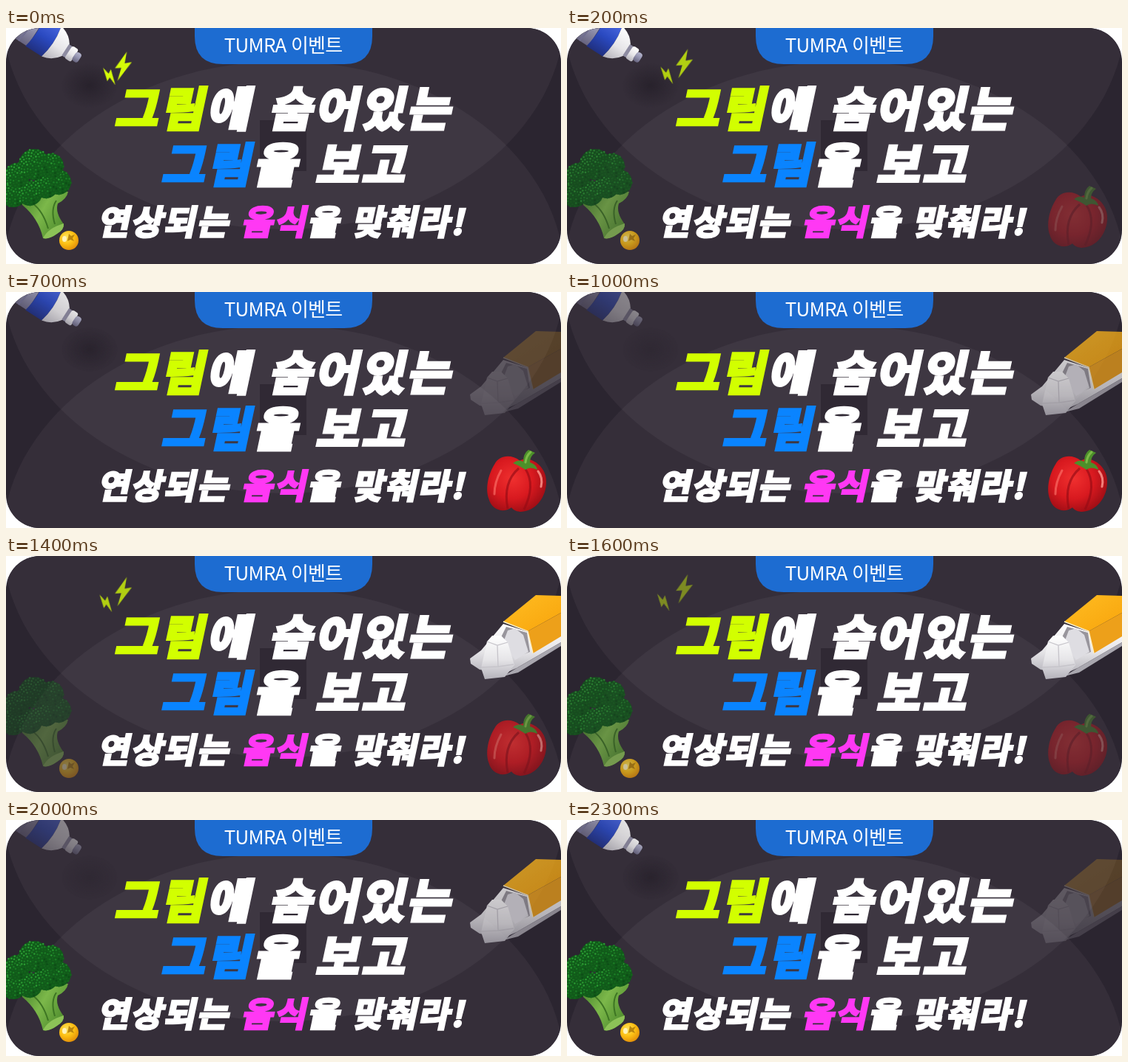
An HTML page for the animation above (2.4 s loop, 750 by 320 pixels).

```html
<!DOCTYPE html>
<html lang="ko">
<head>
<meta charset="utf-8">
<title>이벤트</title>
<style>
html, body { margin: 0; width: 100%; height: 100%; overflow: hidden; background: #fff; }
svg { display: block; width: 750px; height: 320px; }
text { font-family: "Noto Sans CJK KR", "Noto Sans CJK", "Noto Sans CJK JP", sans-serif; text-anchor: middle; }
.tab { font-size: 26px; letter-spacing: -.8px; fill: #fff; }
.title { font-weight: 900; fill: #fff; stroke: #fff; stroke-linejoin: miter; }
.big { font-size: 63px; letter-spacing: 4.2px; stroke-width: 4.4; }
.small { font-size: 46px; letter-spacing: 2.4px; stroke-width: 3; }
.lime { fill: #d2ff00; stroke: #d2ff00; }
.blue { fill: #0a84ff; stroke: #0a84ff; }
.pink { fill: #ff38f4; stroke: #ff38f4; }
.item { animation: swap 2400ms infinite; }
.pepper { animation-delay: -1200ms; }
.bottle { animation-delay: -1800ms; }
.carton { animation-delay: -600ms; }
.spark, .spark use { animation: 1200ms infinite; }
.spark { animation-name: spark; }
.spark .upper { animation-name: rise; }
.spark .lower { animation-name: drift; }

/* Each fade takes a quarter of the loop in six hard steps. */
@keyframes swap {
  0% { opacity: 1; animation-timing-function: steps(3); }
  12.5% { opacity: .62; animation-timing-function: steps(3); }
  25%, 50% { opacity: 0; animation-timing-function: steps(3); }
  62.5% { opacity: .62; animation-timing-function: steps(3); }
  75%, 100% { opacity: 1; }
}
@keyframes spark {
  0% { opacity: 1; animation-timing-function: steps(3); }
  25% { opacity: .68; animation-timing-function: steps(3); }
  50%, 100% { opacity: 0; }
}
@keyframes rise {
  0% { transform: translate(158px, 52px) rotate(3deg) scale(1.06); animation-timing-function: steps(6); }
  50%, 100% { transform: translate(158px, 41px) rotate(3deg) scale(1.06); }
}
@keyframes drift {
  0% { transform: translate(140px, 65px) rotate(-50deg) scale(.74); animation-timing-function: steps(6); }
  50%, 100% { transform: translate(126px, 61px) rotate(-50deg) scale(.74); }
}
</style>
</head>
<body>
<svg viewBox="0 0 750 320">
  <defs>
    <clipPath id="card"><rect width="750" height="320" rx="46"/></clipPath>
    <clipPath id="lens"><ellipse cx="375" cy="-20" rx="380" ry="293"/></clipPath>
    <path id="bolt" d="M4-19-10 3-2 2-6 19 11-6 2-4Z"/>
    <linearGradient id="plastic" x2="0" y2="1">
      <stop stop-color="#b4b4cc"/><stop offset=".45" stop-color="#9696b2"/><stop offset="1" stop-color="#67647f"/>
    </linearGradient>
    <linearGradient id="label" x2="0" y2="1">
      <stop stop-color="#4a68e0"/><stop offset=".5" stop-color="#2a49c0"/><stop offset="1" stop-color="#203080"/>
    </linearGradient>
    <linearGradient id="white" x2="0" y2="1">
      <stop stop-color="#fff"/><stop offset=".55" stop-color="#e6e5e8"/><stop offset="1" stop-color="#b4b2ba"/>
    </linearGradient>
    <linearGradient id="stem" x2="1" y2=".6">
      <stop stop-color="#44802a"/><stop offset=".5" stop-color="#7cb84a"/><stop offset="1" stop-color="#4f8c2e"/>
    </linearGradient>
    <radialGradient id="fruit" cx=".38" cy=".32" r=".75">
      <stop stop-color="#ffe35c"/><stop offset=".5" stop-color="#fcc014"/><stop offset="1" stop-color="#e08a08"/>
    </radialGradient>
    <radialGradient id="red" cx=".4" cy=".4" r=".72">
      <stop stop-color="#f0302f"/><stop offset=".5" stop-color="#d8191f"/><stop offset="1" stop-color="#8c0a12"/>
    </radialGradient>
    <radialGradient id="shade">
      <stop stop-color="#28222c"/><stop offset="1" stop-color="#28222c" stop-opacity="0"/>
    </radialGradient>
    <linearGradient id="sleeve" x2="1" y2="1">
      <stop stop-color="#ffbd22"/><stop offset="1" stop-color="#f8a40c"/>
    </linearGradient>
  </defs>

  <g clip-path="url(#card)">
    <rect width="750" height="320" fill="#2b2530"/>
    <ellipse cx="375" cy="-20" rx="380" ry="293" fill="#352e39"/>
    <ellipse cx="375" cy="338" rx="380" ry="293" fill="#352e39"/>
    <ellipse cx="375" cy="338" rx="380" ry="293" fill="#3e3742" clip-path="url(#lens)"/>
    <rect x="343" y="125" width="63" height="69" fill="#302934"/>

    <path d="M255 0H495V11Q495 49 457 49H293Q255 49 255 11Z" fill="#1d6cd1"/>
    <text class="tab" x="374.6" y="32.5">TUMRA 이벤트</text>

    <g class="item bottle">
      <ellipse cx="113" cy="78" rx="38" ry="30" fill="url(#shade)"/>
      <g transform="translate(50 10) rotate(33)">
        <path d="M-60-23H-10V24H-60Z" fill="url(#plastic)"/>
        <path d="M-38-23Q-33 0-38 24M-24-23Q-19 0-24 24" fill="none" stroke="#706e90" stroke-width="2"/>
        <path d="M-12-24H14Q20 0 14 25H-12Q-7 0-12-24Z" fill="url(#label)"/>
        <path d="M14-24Q29-21 37-9V9Q29 22 14 25Q20 0 14-24Z" fill="url(#white)"/>
        <path d="M36-9H42V9H36Z" fill="#8e8ca2"/>
        <rect x="41" y="-10" width="10" height="20" rx="3" fill="url(#white)"/>
        <rect x="50" y="-7" width="9" height="14" rx="4" fill="url(#plastic)"/>
      </g>
    </g>

    <g class="spark" fill="#d4fc08">
      <use class="upper" href="#bolt"/>
      <use class="lower" href="#bolt"/>
    </g>

    <g class="item broccoli">
      <path d="M22 230 50 222 84 222Q82 232 70 238 66 250 78 266 79 273 69 279 58 287 50 285 44 258 22 240Z" fill="url(#stem)"/>
      <path d="M50 285Q57 271 78 265 79 273 69 279 58 287 50 285Z" fill="#8cc257"/>
      <path d="M36 238Q50 248 57 272M68 234Q60 246 66 266" fill="none" stroke="#3d7523" stroke-width="2"/>
      <g id="crown"></g>
      <circle cx="85" cy="288" r="13" fill="url(#fruit)"/>
      <ellipse cx="79" cy="286" rx="3" ry="4" fill="#fff3b8"/>
      <path d="M85 279 88 282 93 280 90 285 92 289 87 287 83 289 84 284Z" fill="#b9850d"/>
    </g>

    <g class="item pepper">
      <path transform="translate(691 262) rotate(13) scale(1.04) translate(-694 -262)" d="M659 242C662 229 677 224 690 230C701 220 724 229 729 247C734 264 728 284 713 292C706 296 698 296 693 292C684 303 668 300 662 288C654 276 654 256 659 242Z" fill="url(#red)"/>
      <path d="M693 239Q671 258 678 294M702 240Q716 262 700 295" fill="none" stroke="#960b14" stroke-width="3" opacity=".65"/>
      <path d="M669 242Q660 258 660 274" fill="none" stroke="#ff7a70" stroke-width="3" stroke-linecap="round" opacity=".6"/>
      <path d="M719 243Q726 252 723 264" fill="none" stroke="#ff9c92" stroke-width="3" stroke-linecap="round" opacity=".8"/>
      <path d="M685 232Q692 226 699 230Q699 219 706 214L715 218Q708 223 708 231Q717 234 718 241Q708 236 702 241Q695 236 685 232Z" fill="#4c8f2a"/>
      <path d="M702 231Q703 222 709 217" fill="none" stroke="#7dbb48" stroke-width="3" stroke-linecap="round"/>
    </g>

    <g class="item carton">
      <path d="M627 139 642 128 672 92 706 103 750 95V117L690 152 672 160 640 154 628 146Z" fill="url(#white)"/>
      <path d="M690 152 750 117V122L692 158 672 163Z" fill="#a9a7af"/>
      <path d="M676 96 704 104 708 130 688 138 668 112Z" fill="#98959c"/>
      <path d="M672 117 678 101 688 98 699 107 706 130 688 141Z" fill="#dedde2"/>
      <path d="M642 152 650 116 657 108 669 108 678 117 687 148 674 164 647 167Z" fill="url(#white)"/>
      <path d="M650 116 664 121 678 117M664 121 665 150M641 151 665 150 686 147" fill="none" stroke="#c6c4ca" stroke-width="1.3"/>
      <path d="M672 89 716 53 750 54V77L705 102Z" fill="url(#sleeve)"/>
      <path d="M705 102 750 77V109L712 132Z" fill="#eda01a"/>
      <path d="M672 89 705 102 712 132" fill="none" stroke="#fff1ca" stroke-width="1.5"/>
    </g>

    <text class="title big" transform="translate(375 133) skewX(-12)"><tspan class="lime">그림</tspan>에 숨어있는</text>
    <text class="title big" transform="translate(376 209) skewX(-12)"><tspan class="blue">그림</tspan>을 보고</text>
    <text class="title small" transform="translate(372 280) skewX(-12)">연상되는 <tspan class="pink">음식</tspan>을 맞춰라!</text>
  </g>
</svg>
<script>
const crown = document.getElementById('crown');
const greens = ['#0d4d16', '#14641c', '#1b7d25', '#2a9a32'];

function dot(x, y, r, fill) {
  const c = document.createElementNS('http://www.w3.org/2000/svg', 'circle');
  Object.entries({ cx: x, cy: y, r, fill }).forEach(([k, v]) => c.setAttribute(k, v));
  crown.append(c);
}

// Buds sit on a golden-angle spiral, lighter towards the upper left.
function floret(x, y, r) {
  dot(x, y, r, '#115a1a');
  const count = Math.round(r * r / 5);
  for (let i = 0; i < count; i++) {
    const d = r * Math.sqrt((i + .5) / count), a = i * 2.4;
    const dx = d * Math.cos(a), dy = d * Math.sin(a);
    const light = 1.8 - (dx + 1.2 * dy) / r + (i % 3 - 1) * .7;
    dot(x + dx, y + dy, 1.3, greens[Math.max(0, Math.min(3, Math.round(light)))]);
  }
}

[[71, 209, 17], [10, 225, 18], [32, 224, 17], [54, 214, 17],
 [15, 200, 17], [61, 187, 17], [38, 185, 21]].forEach(f => floret(...f));
</script>
</body>
</html>
```
